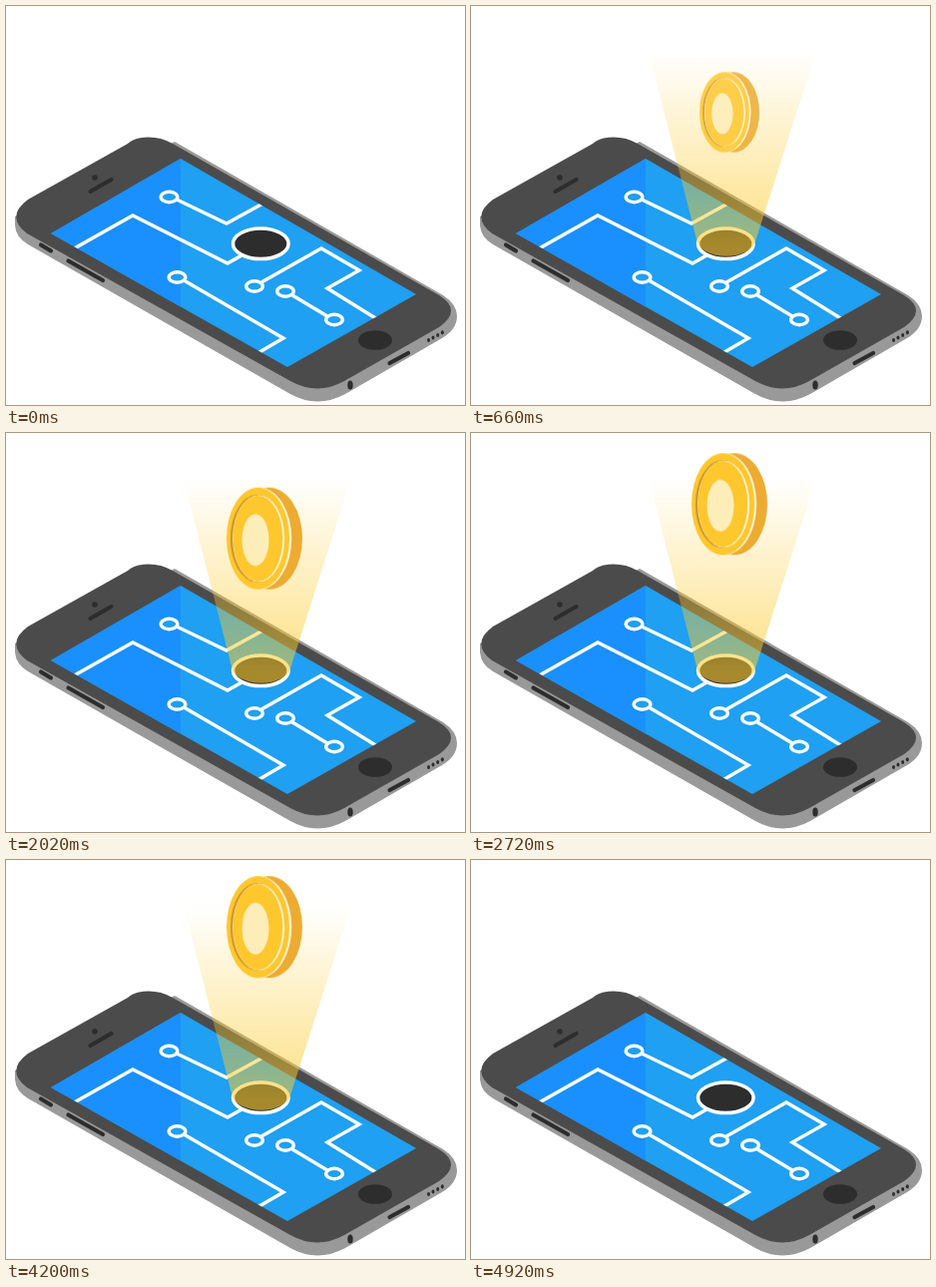
Animation, 460 px wide and 400 px high, one loop 5600 ms. Source, as an HTML page without scripts:

```html
<!DOCTYPE html>
<html lang="en">
<head>
<meta charset="utf-8">
<title>Coin over phone</title>
<style>
  html, body { margin: 0; width: 100%; height: 100%; overflow: hidden; background: #fff; }
  svg { display: block; width: 100vw; height: 100vh; }

  .ink { fill: #2d2d2d; }
  .slot { stroke: #2d2d2d; stroke-width: 4.2; stroke-linecap: round; }
  .trace { fill: none; stroke: #fff; stroke-width: 3.4; }
  .pad { fill: #1fa0f2; stroke: #fff; stroke-width: 3.4; }

  .beam { animation: beam 5.6s linear infinite; }
  .coin { transform-origin: 259px 67px; animation: coin 5.6s linear infinite; }

  @keyframes beam {
    0%, .1% { opacity: 0; }
    10.36%, 78.5% { opacity: 1; }
    87.86%, 100% { opacity: 0; }
  }

  /* rise, bob twice, sink back into the opening */
  @keyframes coin {
    0%, 10.36% { opacity: 0; transform: translate(0, 64px) scale(.66); animation-timing-function: ease-out; }
    12.5% { opacity: 1; }
    16.07% { opacity: 1; transform: none; }
    23.04% { transform: none; animation-timing-function: cubic-bezier(.65, 0, .35, 1); }
    33.04% { transform: translate(0, 40px); }
    34.29% { transform: translate(0, 40px); animation-timing-function: cubic-bezier(.65, 0, .35, 1); }
    44.29% { transform: none; }
    45.54% { transform: none; animation-timing-function: cubic-bezier(.65, 0, .35, 1); }
    55.9% { transform: translate(0, 40px); }
    57.5% { transform: translate(0, 40px); animation-timing-function: cubic-bezier(.65, 0, .35, 1); }
    67.14% { transform: none; }
    74.82% { opacity: 1; transform: none; animation-timing-function: ease-in; }
    80.71% { opacity: .94; transform: translate(-2px, 78px) scale(.67); }
    85%, 100% { opacity: 0; transform: translate(-4px, 171px) scale(.22); }
  }
</style>
</head>
<body>
<svg viewBox="0 0 460 400">
  <defs>
    <linearGradient id="glow" gradientUnits="userSpaceOnUse" x1="0" y1="45" x2="0" y2="240">
      <stop offset="0" stop-color="#fbca2c" stop-opacity="0"/>
      <stop offset="1" stop-color="#fbca2c" stop-opacity=".59"/>
    </linearGradient>
    <clipPath id="screen"><path d="M175 153 411 289 282 362 45 228Z"/></clipPath>
    <ellipse id="pad" class="pad" rx="8.3" ry="5.2"/>
    <ellipse id="vent" class="ink" rx="1.5" ry="2.1"/>
  </defs>

  <!-- phone body -->
  <path fill="#999" d="M9 211V220Q10 232 22 239L285 389Q312 404 340 389L437 333Q452 324 452 311Q452 299 438 290L169 136 100 170Z"/>
  <path fill="#4b4b4b" d="M22 194 122 138Q126 134 133 132.500Q151 129 167 138L434 290Q458 305 434 322L339 376Q312 391 285 376L21 228Q-1 211 22 194Z"/>
  <circle class="ink" cx="89" cy="172" r="2.800"/>
  <path class="slot" d="M84.500 186 105.500 174M35 239.500 45 245.500M62.500 255.500 97 275M384.500 358 403 348"/>
  <ellipse class="ink" cx="345" cy="380" rx="2.700" ry="4.500"/>
  <ellipse class="ink" cx="370" cy="335" rx="17" ry="9.800"/>
  <use href="#vent" x="423.500" y="335"/>
  <use href="#vent" x="428" y="332.500"/>
  <use href="#vent" x="432.700" y="330"/>
  <use href="#vent" x="437.300" y="327.300"/>

  <!-- screen and circuit -->
  <g clip-path="url(#screen)">
    <path fill="#1fa0f2" d="M0 140H460V380H0Z"/>
    <path fill="#1a90ff" d="M0 140H175V380H0Z"/>
    <path class="trace" d="M171 194 221 218 262 195.500M64 245.500 127 210 222 258 238 249M179 275.500 278 333 248 350.500M256 277 316 243 354 265 322 283 376 316.500M287 290 322 311"/>
    <use href="#pad" x="163.500" y="191.500"/>
    <use href="#pad" x="171.500" y="272"/>
    <use href="#pad" x="249" y="281"/>
    <use href="#pad" x="280" y="286"/>
    <use href="#pad" x="329" y="314.500"/>
  </g>
  <ellipse cx="255.300" cy="238.300" rx="27.800" ry="15.300" fill="#2d2d2d" stroke="#fff" stroke-width="3.500"/>

  <path class="beam" fill="url(#glow)" d="M178 45H346L285 236A29.500 17 0 0 1 226.500 236Z"/>

  <g class="coin">
    <ellipse cx="264" cy="67" rx="33" ry="51" fill="#edab31"/>
    <ellipse cx="254" cy="67" rx="32.300" ry="51" fill="#fff3cf"/>
    <ellipse cx="252.500" cy="67" rx="31.500" ry="51" fill="#fec72e"/>
    <ellipse cx="251.800" cy="67" rx="27" ry="44" fill="#cf982b"/>
    <ellipse cx="253.200" cy="67" rx="26" ry="43.600" fill="#fff3cf"/>
    <ellipse cx="252.400" cy="67" rx="24.800" ry="43" fill="#fec72e"/>
    <ellipse cx="250" cy="68.500" rx="13.500" ry="26" fill="#fdedb8"/>
  </g>
</svg>
</body>
</html>
```
